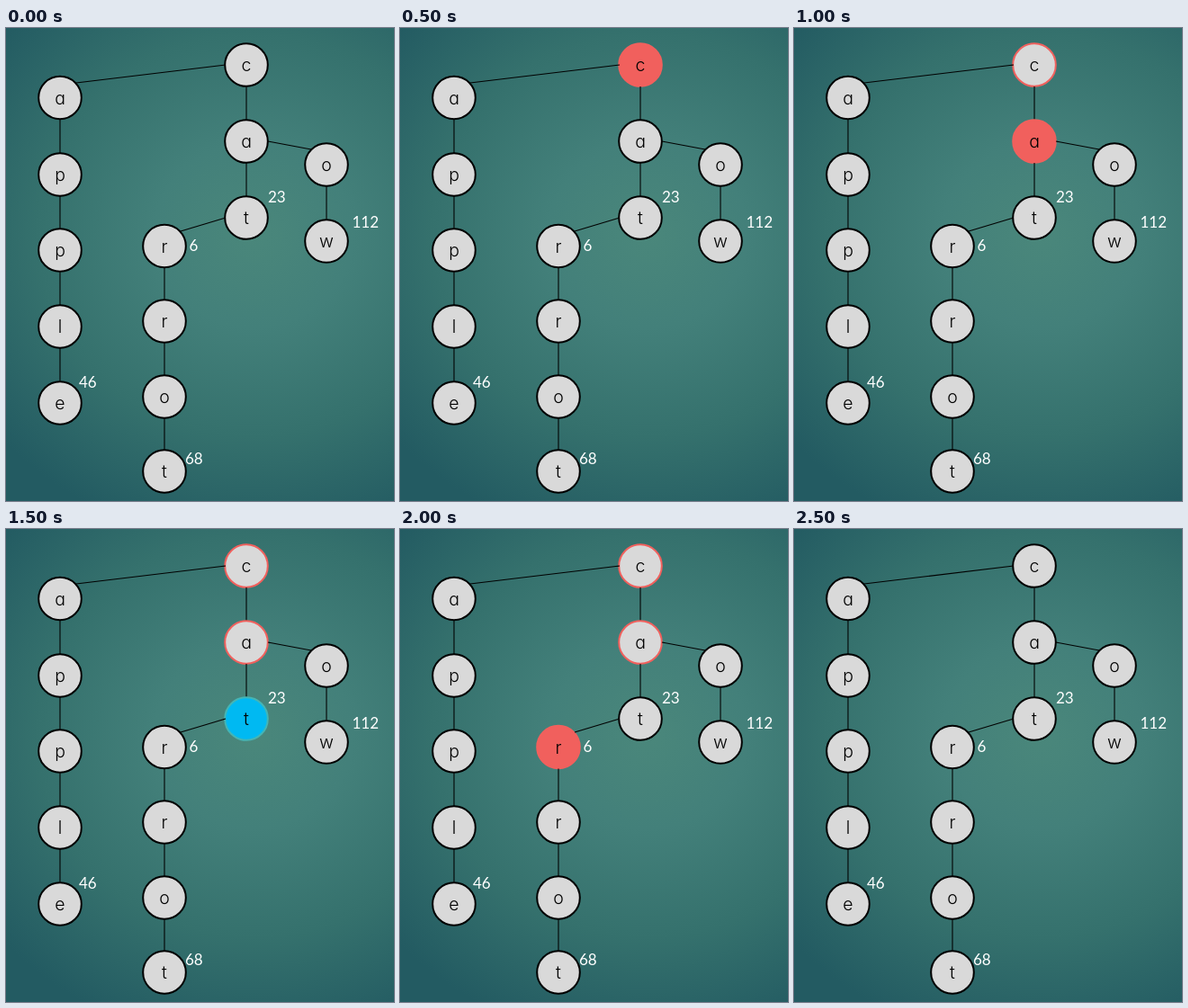
Recreate the animation shown at these times as an HTML page. Size 431x526 px, loop 3000 ms.

```html
<!DOCTYPE html>
<html lang="en">
<head>
<meta charset="utf-8">
<title>Trie lookup</title>
<style>
html, body { margin: 0; width: 100%; height: 100%; overflow: hidden; }
body { background: radial-gradient(370px 345px at 275px 230px, #4a877b, #43807a 30%, #35716d 65%, #235b62 100%); }
svg { display: block; }
line { stroke: #000; stroke-width: 1.1; }
circle { fill: #d9d9d9; stroke: #000; stroke-width: 2; }
.visited circle { stroke: #f1605d; }
.active circle { fill: #f1605d; stroke: #f1605d; }
.found circle { fill: #00b9f2; stroke: #45b5b5; }
/* cv11 selects the single-storey a */
.letter { font: 300 19.5px Inter, sans-serif; font-feature-settings: "cv11"; text-anchor: middle; }
.value { font: 17px Lato, sans-serif; fill: #fff; }
</style>
</head>
<body>
<svg width="431" height="526" viewBox="0 0 431 526"></svg>
<script>
const svg = document.querySelector("svg");
const STEP = 500;

// Vertical chains: letters from top to bottom at a shared x
const chains = [
  { x: 60, letters: "apple", ys: [77.5, 163, 247, 332, 417] },
  { x: 267, letters: "cat", ys: [41, 126, 211] },
  { x: 176, letters: "rrot", ys: [242.5, 326, 410, 493] },
  { x: 356, letters: "ow", ys: [152, 237] },
];
const branches = [[78, 61, 244, 41], [291, 126, 339, 135], [244, 211, 194, 226]];
const values = [[81, 399.5, 46], [291, 193.5, 23], [203.5, 248, 6], [199, 484.5, 68], [384.5, 222, 112]];

function add(parent, tag, attrs, text = "") {
  const el = document.createElementNS("http://www.w3.org/2000/svg", tag);
  for (const key in attrs) el.setAttribute(key, attrs[key]);
  el.textContent = text;
  return parent.appendChild(el);
}

function addLine(x1, y1, x2, y2) {
  add(svg, "line", { x1, y1, x2, y2 });
}

const nodes = chains.map(({ x, letters, ys }) => ys.map((y, i) => {
  if (i) addLine(x, ys[i - 1] + 24, x, y - 24);
  const node = add(svg, "g", {});
  add(node, "circle", { cx: x, cy: y, r: 23.8 });
  add(node, "text", { class: "letter", x, y: y + 7.3 }, letters[i]);
  return node;
}));
branches.forEach(b => addLine(...b));
values.forEach(([x, y, value]) => add(svg, "text", { class: "value", x, y }, value));

const [c, a, t] = nodes[1];
const r = nodes[2][0];

// Class of each node on the search path, one entry per step
const states = [
  [c, ["", "active", "visited", "visited", "visited", ""]],
  [a, ["", "", "active", "visited", "visited", ""]],
  [t, ["", "", "", "found", "", ""]],
  [r, ["", "", "", "", "active", ""]],
];

function draw() {
  const step = Math.floor(performance.now() / STEP) % 6;
  for (const [node, classes] of states) node.setAttribute("class", classes[step]);
  requestAnimationFrame(draw);
}
draw();
</script>
</body>
</html>
```
